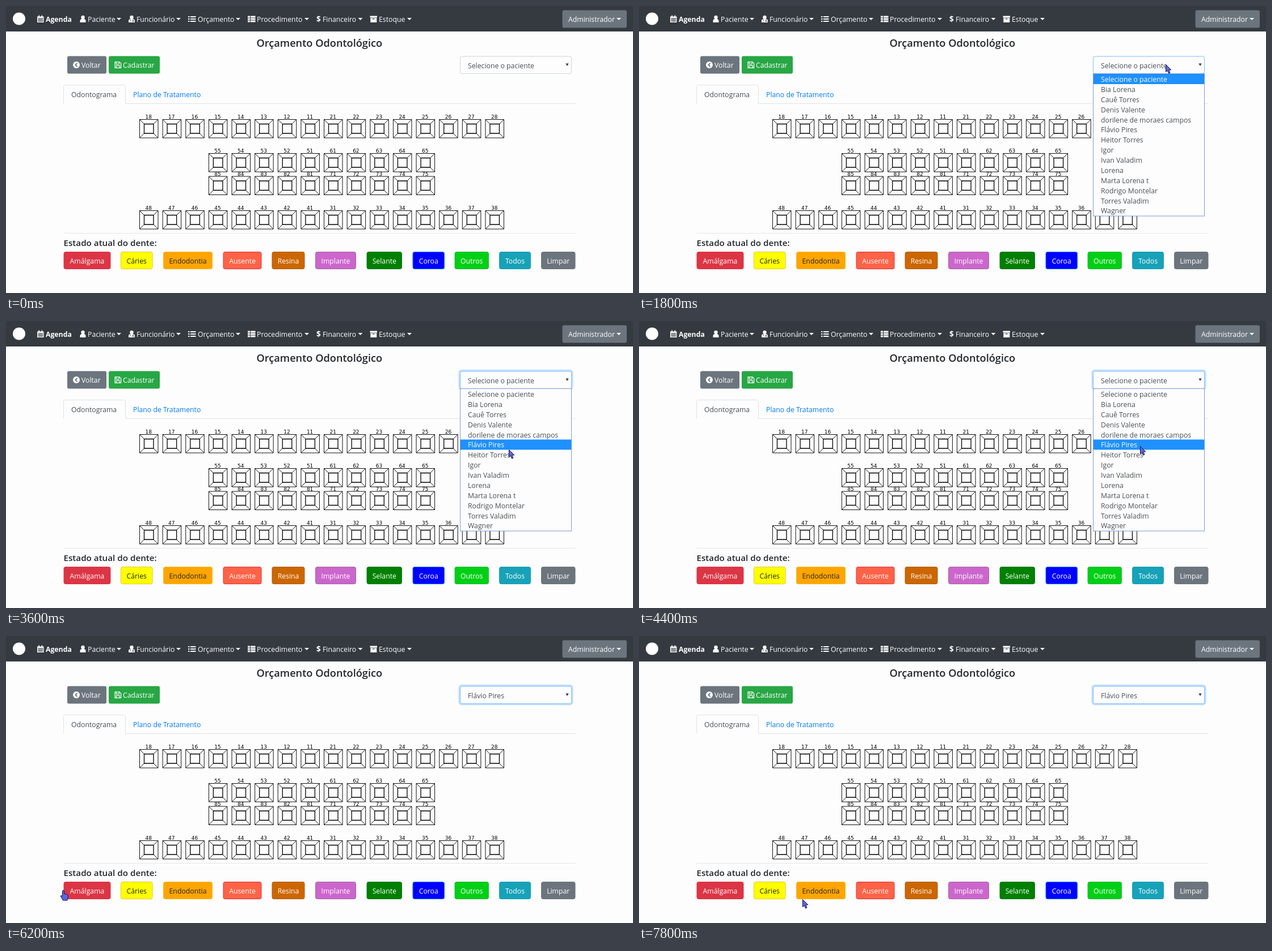
These frames come from a looping animation (1105 by 507 pixels, 8 s). An HTML page:

```html
<!DOCTYPE html>
<html lang="pt-BR">
<head>
<meta charset="utf-8">
<title>Orçamento Odontológico</title>
<style>
html, body { margin: 0; width: 100%; height: 100%; overflow: hidden; background: #fdfdfd; }
svg { display: block; }
text { font: 12.25px "Open Sans", "Noto Sans", sans-serif; white-space: pre; }
.mid { text-anchor: middle; }
.w { fill: #fff; }
.dark { fill: #212529; }
.gray { fill: #495057; }
.num { font: 9px "DejaVu Sans", sans-serif; text-anchor: middle; }
</style>
</head>
<body>
<svg width="1105" height="507" viewBox="0 0 1105 507">
  <rect width="1105" height="45" fill="#343a40"/>
  <circle cx="23" cy="22.5" r="11" class="w"/>
  <g id="nav"></g>

  <!-- menu icons -->
  <g class="w">
    <path d="M55 18.5h11.500v10.500h-11.500z M57.300 16.500h1.800v3h-1.800z M62.400 16.500h1.800v3h-1.800z"/>
    <path d="M55.800 21.800H65.700M55.800 24.200H65.700M55.800 26.500H65.700M58.300 21V28.200M60.800 21V28.200M63.300 21V28.200" stroke="#343a40" stroke-width=".8"/>
    <circle cx="135.500" cy="20" r="3.200"/>
    <path d="M130.500 29v-2.500q0-3.500 3-3.500h4q3 0 3 3.500v2.500z"/>
    <circle cx="221.500" cy="20" r="3.200"/>
    <path d="M216 29v-2.500q0-3.500 3-3.500h5q3 0 3 3.500v2.500z"/>
    <path d="M219 23.500v3M224 23.500v2.500M222.800 27.800v-1.500h2.400v1.500" stroke="#343a40" fill="none" stroke-width=".9"/>
    <path d="M321 18h2.500v2h-2.500z M325 18h9.500v2h-9.500z M321 22h2.500v2h-2.500z M325 22h9.500v2h-9.500z M321 26h2.500v2h-2.500z M325 26h9.500v2h-9.500z"/>
    <path d="M426 17.500h4v3h-4z M431 17.500h8.500v3h-8.500z M426 21.500h4v3h-4z M431 21.500h8.500v3h-8.500z M426 25.500h4v3h-4z M431 25.500h8.500v3h-8.500z"/>
    <text x="547" y="28" style="font-size:13.500px;font-weight:700">$</text>
    <path d="M641.500 17.500h12.500v3h-12.500z M642.300 21.300h11v7.700h-11z"/>
    <path d="M646 23h3.600" stroke="#343a40" stroke-width="1.200"/>
  </g>

  <rect x="980.500" y="7.500" width="113.500" height="31" rx="3" fill="#6c757d"/>
  <text x="991" y="27.500" class="w">Administrador</text>
  <path d="M1076 21h8l-4 4z" class="w"/>

  <text x="552.300" y="72" class="mid dark" style="font-size:18.200px;font-weight:600">Orçamento Odontológico</text>

  <rect x="108" y="88.500" width="69" height="31" rx="3" fill="#6c757d"/>
  <circle cx="124" cy="104" r="6" class="w"/>
  <path d="M125.600 100.800l-3.200 3.200 3.200 3.200" fill="none" stroke="#6c757d" stroke-width="1.800"/>
  <text x="133" y="108.500" class="w">Voltar</text>
  <rect x="181" y="88.500" width="90" height="31" rx="3" fill="#28a745"/>
  <path d="M192 98.800h8l2.600 2.600v8h-10.600zM194.300 99v3.600h5v-3.600M194.300 109v-3.700h6v3.700" fill="none" stroke="#fff" stroke-width="1.200"/>
  <text x="206" y="108.500" class="w">Cadastrar</text>

  <path d="M101.500 172.500V142.500q0-3 3-3H207.500q3 0 3 3V172.500H1003.500" fill="none" stroke="#dee2e6"/>
  <text x="115" y="161" class="gray">Odontograma</text>
  <text x="224" y="161" fill="#007bff">Plano de Tratamento</text>

  <g id="teeth"></g>
  <path d="M101.500 401.500H1003.500" stroke="#e6e6ee"/>
  <text x="101.500" y="424" class="dark" style="font-size:15.200px;font-weight:600">Estado atual do dente:</text>
  <g id="states"></g>

  <rect id="glow" x="799" y="87.300" width="199" height="33.400" rx="4" fill="none" stroke="#bfdeff" stroke-width="3"/>
  <rect id="field" x="800.500" y="89" width="196" height="30.500" rx="3" fill="#fdfdfd"/>
  <text id="value" x="814" y="109.500" class="gray"></text>
  <path d="M986.300 101.500h5.400l-2.700 4.500z" fill="#343a40"/>

  <g id="list">
    <rect x="800.500" y="119.500" width="196" height="251.500" fill="#fdfdfd" stroke="#7b9ad6"/>
    <rect id="mark" x="801" width="195" height="18" fill="#1e90ff"/>
    <g id="options"></g>
  </g>

  <g id="pointer" fill="#5a67e6" stroke="#17173a" stroke-linejoin="round">
    <path id="arrow" d="M.500.500V13.500L3.300 11 5.500 16 8 15 5.800 10.200 9.800 9.800Z"/>
    <path id="hand" d="M-1.600 1.500Q0-1.200 1.600 1.500V6.500L6.500 7.500Q9 8.500 8.500 11.500L7 18H-.500L-4.500 11.500Q-5 9-3 9.500L-1.600 11Z"/>
  </g>
</svg>
<script>
const $ = id => document.getElementById(id);
const LOOP = 8000, STEP = 200, ROW = 17.88, LIST_TOP = 120;
const OPEN = 1800, FOCUS = 2000, CHOOSE = 4600, CHOICE = 5;

const menu = [['Agenda', 70], ['Paciente', 144, 199], ['Funcionário', 230, 304], ['Orçamento', 338, 409],
  ['Procedimento', 442, 530], ['Financeiro', 558, 624.5], ['Estoque', 657, 711]];
$('nav').innerHTML = menu.map(([label, x, caret]) =>
  `<text x="${x}" y="27.5" class="w" ${caret ? '' : 'style="font-weight:700"'}>${label}</text>` +
  (caret ? `<path d="M${caret - 4} 21h8l-4 4z" class="w"/>` : '')).join('');

// Tooth rows: top edge, first column, left quadrant, right quadrant, teeth per quadrant
const rows = [[200.5, 0, 1, 2, 8], [260.5, 3, 5, 6, 5], [301, 3, 8, 7, 5], [361.5, 0, 4, 3, 8]];
function tooth(col, y, label) {
  const x = 235.5 + col * 40.63;
  return `<g transform="translate(${x} ${y})">
    <path d="M0 0H32.500V32.500H0ZM0 0L8 8M32.500 0L24.500 8M0 32.500L8 24.500M32.500 32.500L24.500 24.500" fill="none" stroke="#111"/>
    <path d="M8 8H24.500V24.500H8Z" fill="none" stroke="#000" stroke-width="1.300"/>
    <text x="15.700" y="-1.500" class="num">${label}</text></g>`;
}
$('teeth').innerHTML = rows.map(([y, first, left, right, n]) =>
  Array.from({ length: n * 2 }, (_, i) => {
    const label = i < n ? `${left}${n - i}` : `${right}${i - n + 1}`;
    return tooth(first + i, y, label);
  }).join('')).join('');

const states = [
  ['Amálgama', 101.5, 184.5, '#dc3545', '#dc3545'],
  ['Cáries', 202, 258.5, '#ffff00', '#ecc81a', 'dark'],
  ['Endodontia', 277, 364, '#ffa500', '#f5b820', 'dark'],
  ['Ausente', 382.5, 450.5, '#ff6347', '#dc3545'],
  ['Resina', 468.5, 526.5, '#cc6600', '#a9601c'],
  ['Implante', 545, 617, '#cc66cc', '#9c6a9f'],
  ['Selante', 635.5, 698, '#008000', '#117a2a'],
  ['Coroa', 716.5, 773, '#0000ff', '#007bff'],
  ['Outros', 790.5, 851, '#00d015', '#28b745'],
  ['Todos', 869, 925, '#17a2b8', '#17a2b8'],
  ['Limpar', 943, 1003.5, '#6c757d', '#6c757d']];
$('states').innerHTML = states.map(([label, x1, x2, fill, edge, ink = 'w']) =>
  `<rect x="${x1 + .5}" y="434.5" width="${x2 - x1 - 1}" height="30" rx="3" fill="${fill}" stroke="${edge}"/>
   <text x="${(x1 + x2) / 2}" y="454.5" class="mid ${ink}">${label}</text>`).join('');

const people = ['Selecione o paciente', 'Bia Lorena', 'Cauê Torres', 'Denis Valente', 'dorilene de moraes campos',
  'Flávio Pires', 'Heitor Torres', 'Igor', 'Ivan Valadim', 'Lorena', 'Marta Lorena t',
  'Rodrigo Montelar', 'Torres Valadim', 'Wagner'];
$('options').innerHTML = people.map((name, i) =>
  `<text x="814" y="${134 + i * ROW}">${name}</text>`).join('');
const options = [...$('options').children];

// Pointer tip: time, x, y
const path = [
  [1000, 960, 150], [1200, 945, 125], [1400, 933, 109], [1600, 928, 103],
  [2400, 922, 112], [2600, 908, 131], [2800, 896, 152], [3000, 887, 170], [3200, 887, 178], [3400, 887, 186],
  [3600, 886, 227], [3800, 885, 224], [4000, 884, 222], [4200, 883, 221],
  [5200, 780, 268], [5400, 560, 350], [5600, 320, 428], [5800, 140, 474], [6000, 70, 472], [6200, 101, 449],
  [6400, 122, 446], [6600, 150, 428], [6800, 185, 408], [7000, 228, 440], [7200, 220, 470], [7400, 197, 463],
  [7600, 244, 467], [7800, 288, 465]];

const show = (id, on) => $(id).setAttribute('visibility', on ? 'visible' : 'hidden');

function draw(now) {
  const t = Math.floor(now % LOOP / STEP) * STEP;
  const spot = path.filter(p => p[0] <= t).pop();
  const open = t >= OPEN && t < CHOOSE;

  $('list').style.display = open ? '' : 'none';
  show('glow', t >= FOCUS);
  $('field').setAttribute('stroke', t >= OPEN ? '#80bdff' : '#ced4da');
  $('value').textContent = people[t >= CHOOSE ? CHOICE : 0];

  $('pointer').style.display = spot ? '' : 'none';
  if (spot) {
    const [, x, y] = spot;
    const over = y > 434 && y < 464.5 && states.some(s => x >= s[1] - 1 && x <= s[2]);
    $('pointer').setAttribute('transform', `translate(${x} ${y})`);
    show('arrow', !over);
    show('hand', over);
    const row = Math.max(0, Math.floor((y - LIST_TOP) / ROW));
    $('mark').setAttribute('y', LIST_TOP + row * ROW);
    options.forEach((o, i) => o.setAttribute('class', i === row ? 'w' : 'gray'));
  }
  requestAnimationFrame(loop);
}

let start;
function loop(now) {
  start ??= now;
  draw(now - start);
}
draw(0);
</script>
</body>
</html>
```
